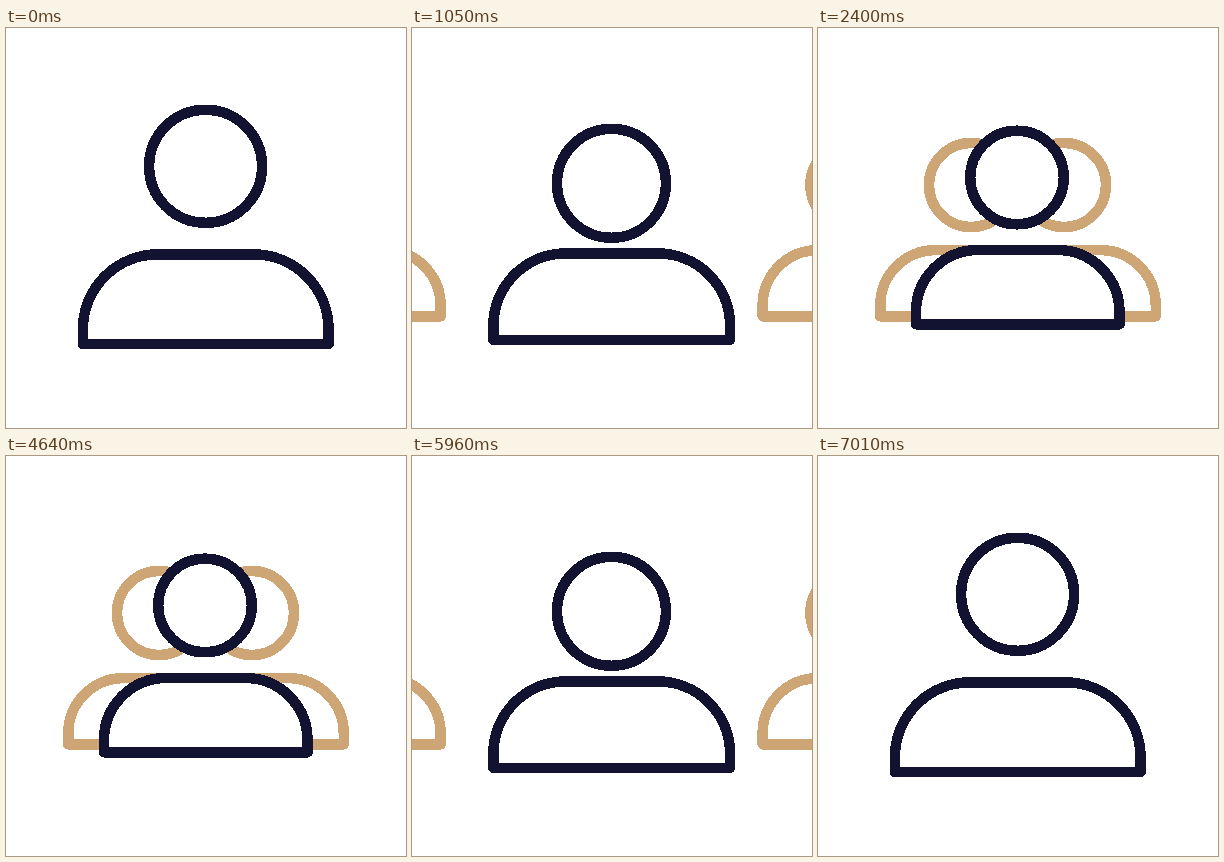
An HTML page for the animation above (8040 ms loop, 400 by 400 pixels).

```html
<!DOCTYPE html>
<html lang="en">
<head>
<meta charset="utf-8">
<title>People</title>
<style>
  html, body { margin: 0; width: 100%; height: 100%; overflow: hidden; background: #fff; }
  svg { display: block; width: 400px; height: 400px; }
  path, circle { fill: #fff; stroke-width: 10.5; stroke-linejoin: round; }
</style>
</head>
<body>
<svg id="stage" viewBox="0 0 400 400" shape-rendering="crispEdges"></svg>
<script>
const stage = document.getElementById('stage');
const NAVY = '#121331', TAN = '#cea676';
const LOOP = 8040, GATHERED = 2400, RETURN = 4640, STEP = 30;

const clamp = v => Math.max(0, Math.min(1, v));
const mix = (a, b, p) => a + (b - a) * p;
const smooth = s => s * s * (3 - 2 * s);

// Cubic bezier (k, 0, 1 - k, 1), solved by bisection.
function ease(u, k) {
  let lo = 0, hi = 1;
  for (let i = 0; i < 24; i++) {
    const s = (lo + hi) / 2, r = 1 - s;
    const x = 3 * k * s * r * r + 3 * (1 - k) * s * s * r + s * s * s;
    if (x < u) lo = s; else hi = s;
  }
  return smooth((lo + hi) / 2);
}

// Bounce of the front head: [time, centre y].
const BOUNCE = [[0, 138.3], [600, 111.2], [1200, 163.5], [1690, 138.3], [2400, 149.5]];

function headY(t) {
  const i = Math.max(1, BOUNCE.findIndex(([time]) => t <= time));
  const [t0, y0] = BOUNCE[i - 1], [t1, y1] = BOUNCE[i];
  return mix(y0, y1, smooth(clamp((t - t0) / (t1 - t0))));
}

function add(tag, color) {
  const node = document.createElementNS('http://www.w3.org/2000/svg', tag);
  node.setAttribute('stroke', color);
  return stage.appendChild(node);
}

function person(color) {
  const body = add('path', color), head = add('circle', color);
  return {
    shoulders(x, top, width) {
      const left = x - width / 2, right = x + width / 2;
      const bottom = top + width * 0.365, r = width * 0.305;
      body.setAttribute('d', `M${left} ${bottom}V${top + r}` +
        `A${r} ${r} 0 0 1 ${left + r} ${top}H${right - r}` +
        `A${r} ${r} 0 0 1 ${right} ${top + r}V${bottom}Z`);
    },
    head(x, y, r) {
      head.setAttribute('cx', x);
      head.setAttribute('cy', y);
      head.setAttribute('r', r);
    }
  };
}

const leftPerson = person(TAN), rightPerson = person(TAN), frontPerson = person(NAVY);

function placeSide(side, x, headX) {
  side.shoulders(x, 222.1, 181.5);
  side.head(headX, 157, 42);
}

function draw(t) {
  const u = clamp((t - 600) / 1200);
  const slide = ease(u, 0.6), shrink = ease(u, 0.64);
  const left = mix(-126, 153, slide), right = mix(499, 247, slide);

  placeSide(leftPerson, left, left);
  placeSide(rightPerson, right, right - 1);
  frontPerson.shoulders(199.75, mix(226.4, 222, shrink), mix(245.6, 203.5, shrink));
  frontPerson.head(mix(199.6, 199, shrink), headY(t), mix(56.5, 46.8, shrink));
}

function poseTime(t) {
  if (t < RETURN) return Math.min(GATHERED, Math.floor(t / STEP) * STEP);
  return Math.max(0, GATHERED - STEP - Math.floor((t - RETURN) / STEP) * STEP);
}

const start = performance.now();
function tick() {
  draw(poseTime((performance.now() - start) % LOOP));
  requestAnimationFrame(tick);
}
tick();
</script>
</body>
</html>
```
